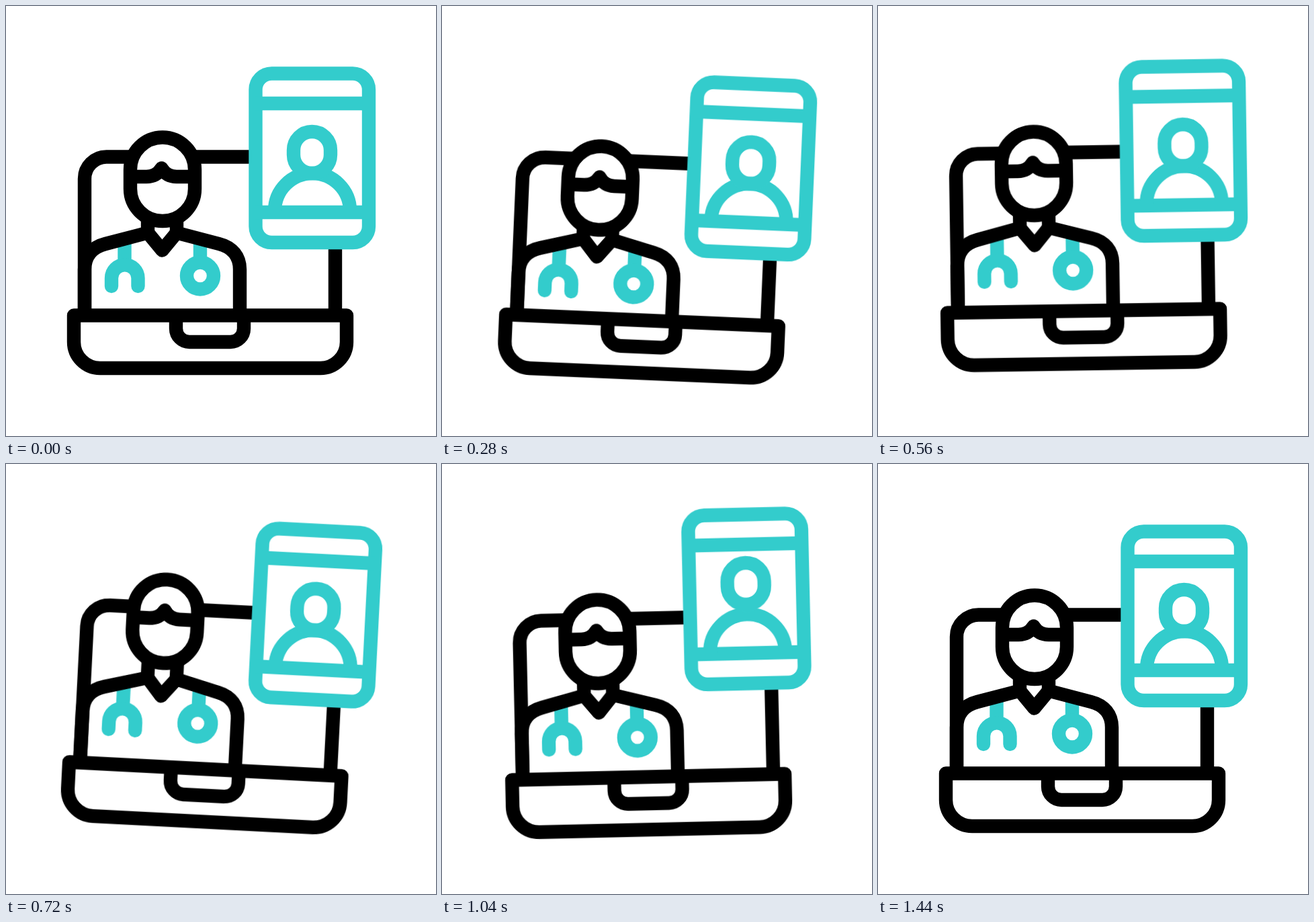
Recreate the animation shown at these times as an HTML page without scripts. Size 640 px wide and 640 px high, loop 1.6 s.

```html
<!DOCTYPE html>
<html lang="en">
<head>
<meta charset="utf-8">
<title>Online doctor</title>
<style>
  html, body { margin: 0; height: 100%; overflow: hidden; background: #fff; }
  svg { display: block; width: 100%; height: 100%; }

  .line { fill: none; stroke: #000; stroke-width: 20.4; stroke-linejoin: round; }
  .teal { stroke: #33cccc; }
  .solid { fill: #fff; }
  .round { stroke-linecap: round; }

  .hop, .sway, .bob, .leap, .nod, .ray {
    animation: 1.6s cubic-bezier(.333, 0, .667, 1) infinite;
  }
  .hop { animation-name: hop; }
  .sway { animation-name: sway; transform-origin: 320px 320px; }
  .bob { animation-name: bob; }
  .torso { --reach: 1; }
  .head { --reach: 1.65; }
  .leap { animation-name: leap; }
  .nod { animation-name: nod; }
  .ray { stroke-dasharray: 1 2; animation-name: shoot; }
  .rays { animation: flash 1.6s step-end infinite; }

  /* crouch, jump, land, settle */
  @keyframes hop {
    0% { transform: translateY(0); animation-timing-function: cubic-bezier(.33, .4, .67, .85); }
    28.125% { transform: translateY(11.2px); }
    38.75% { transform: translateY(-14px); }
    55.625% { transform: translateY(13px); }
    71.875%, 100% { transform: translateY(0); }
  }
  @keyframes sway {
    0% { transform: rotate(0); }
    15%, 44.375% { transform: rotate(3deg); }
    28.75%, 56.875% { transform: rotate(-3deg); }
    71.875%, 100% { transform: rotate(0); }
  }
  @keyframes bob {
    0%, 8.75% { transform: translateY(0); }
    26.25% { transform: translateY(calc(var(--reach) * 10.6px)); }
    41.25% { transform: translateY(calc(var(--reach) * -8.8px)); }
    67.5%, 100% { transform: translateY(0); }
  }
  @keyframes leap {
    0% { transform: translateY(0); }
    25% { transform: translateY(2px); }
    40%, 45% { transform: translateY(-3px); }
    60% { transform: translateY(-42px); }
    72.5% { transform: translateY(-1px); }
    75%, 100% { transform: translateY(0); }
  }
  @keyframes nod {
    0%, 48.75% { transform: translateY(0); }
    58.125% { transform: translateY(-19px); }
    80%, 100% { transform: translateY(0); }
  }
  @keyframes shoot {
    0%, 67.5% { stroke-dashoffset: 1; }
    72.5% { stroke-dashoffset: .3; animation-timing-function: ease-out; }
    76.25%, 78.75% { stroke-dashoffset: 0; }
    90%, 100% { stroke-dashoffset: -1; }
  }
  @keyframes flash {
    0% { opacity: 0; }
    69% { opacity: 1; }
    89.5%, 100% { opacity: 0; }
  }
</style>
</head>
<body>
<svg viewBox="0 0 640 640">
  <g class="hop"><g class="sway line">
    <path d="M117 460V257a32.5 32.5 0 0 1 32.5-32.5H490V460"/>

    <g class="bob torso">
      <g class="teal">
        <path d="M176.5 345V385M289 345V382"/>
        <path class="round" d="M157 417V405a19.75 19.75 0 0 1 39.5 0V417"/>
        <circle cx="289" cy="401.5" r="20"/>
      </g>
      <path d="M117 485V392C117 373 128 359 148 354L211 337.500L232.5 363.500L254 337.500L317 354C337 359 348 373 348 392V485"/>
      <path d="M211 310V337M254 310V337"/>
    </g>

    <g class="bob head">
      <path class="solid" d="M185 243.500a48 48 0 0 1 96 0V272a48 48 0 0 1-96 0Z"/>
      <path d="M185 254H209Q224 254 231.5 241.500Q239 254 254 254H281"/>
    </g>

    <path class="solid" d="M101 460.500H507V500a39 39 0 0 1-39 39H140a39 39 0 0 1-39-39Z"/>
    <path d="M253 460V480a20 20 0 0 0 20 20H334a20 20 0 0 0 20-20V460"/>

    <g class="leap teal">
      <rect class="solid" x="371.5" y="100.5" width="168.500" height="251.500" rx="24"/>
      <path d="M371 145H540M371 307H540"/>
      <path d="M400 305a56 56 0 0 1 112 0"/>
      <rect class="nod" x="428" y="187" width="55" height="62" rx="27.5"/>
    </g>
  </g></g>

  <g class="rays line round">
    <path class="ray" pathLength="1" d="M456.500 80V32"/>
    <path class="ray" pathLength="1" d="M374.500 124L343.500 93"/>
    <path class="ray" pathLength="1" d="M537 124L568 93"/>
  </g>
</svg>
</body>
</html>
```
